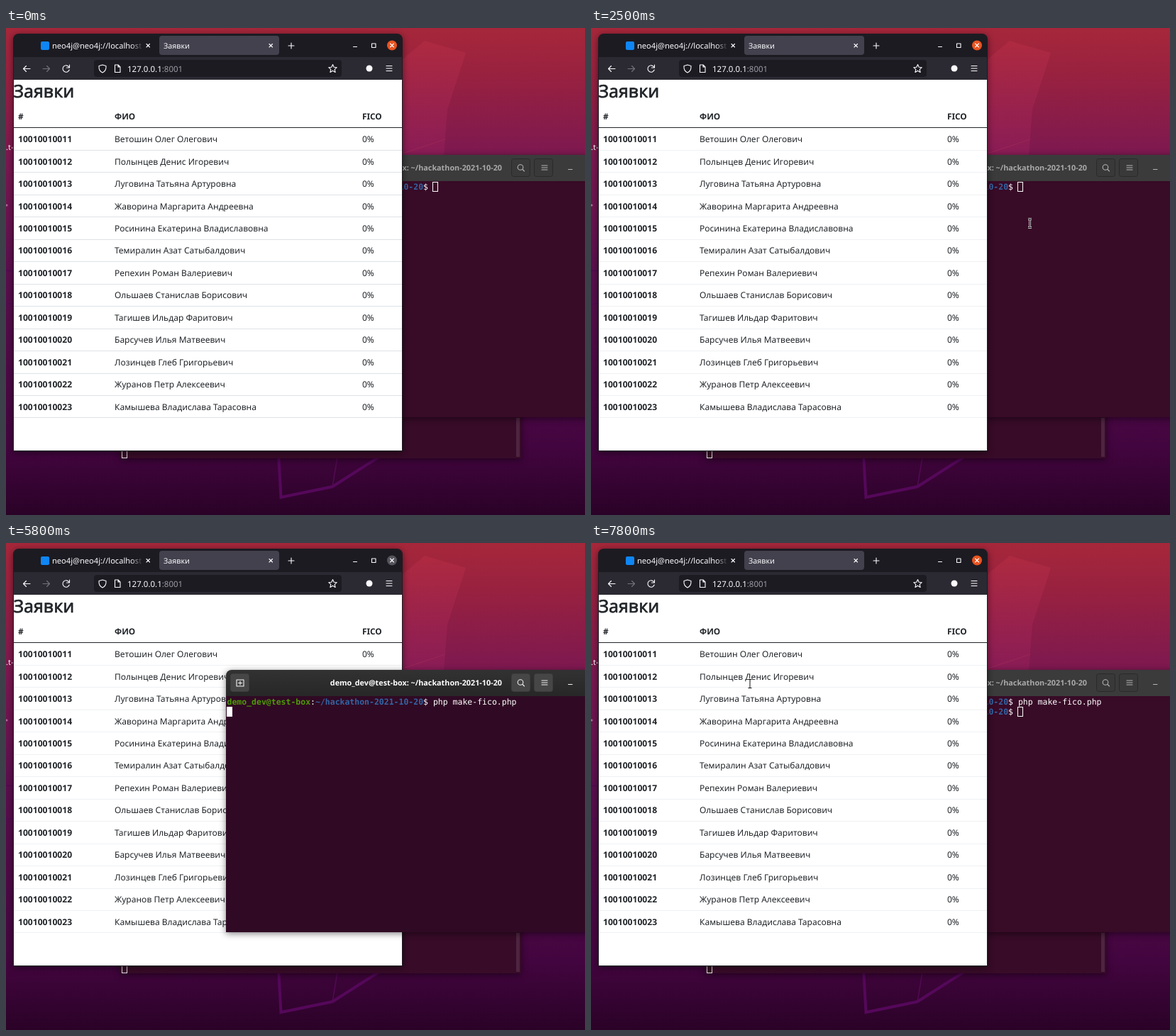
Recreate the animation shown at these times as an HTML page. Size 816 by 687 pixels, loop 8000 ms.

```html
<!DOCTYPE html>
<html lang="ru">
<head>
<meta charset="utf-8">
<title>Заявки</title>
<style>
html, body { margin: 0; width: 100%; height: 100%; overflow: hidden; background: #3c0638; }
svg { display: block; width: 816px; height: 687px; }
text { font-family: "Noto Sans", "Open Sans", sans-serif; white-space: pre; text-rendering: geometricPrecision; }
.line { fill: none; stroke: #fbfbfe; stroke-width: 1.1; stroke-linecap: round; stroke-linejoin: round; }
.page text { font-size: 12px; fill: #212529; }
.page .bold { font-size: 12.1px; font-weight: 700; }
.page .head { font-size: 11.8px; font-weight: 700; }
.page .title { font-size: 24.8px; stroke: #212529; stroke-width: .7px; }
.shade { filter: drop-shadow(0 2px 5px rgba(0, 0, 0, .5)); }
.mono text { font: 11.49px "DejaVu Sans Mono", monospace; fill: #fff; }
.user, .path { font-weight: 700; }
.user { fill: #4e9a06; }
.path { fill: #3465a4; }
#body { fill: #380b27; }
#bar { fill: #3b3b3b; }
#caption { font-size: 10.8px; font-weight: 700; fill: #a9a9a9; text-anchor: end; }
.btn { fill: #393939; stroke: #2a2a2a; }
#term .line { stroke: #b5b5b5; }
#close { fill: #e95420; }
.typing #body { fill: #300a24; }
.typing #bar { fill: url(#barFill); }
.typing #caption { fill: #fff; }
.typing .btn { fill: #464646; stroke: #3d3d3d; }
.typing #term .line { stroke: #f2f2f2; }
.typing #close { fill: #55545c; }
.hidden { display: none; }
</style>
</head>
<body>
<svg id="stage" viewBox="0 0 816 687">
  <defs>
    <linearGradient id="sky" x2="0" y2="1">
      <stop stop-color="#a6273a"/><stop offset=".1" stop-color="#982140"/>
      <stop offset=".27" stop-color="#7b1851"/><stop offset=".5" stop-color="#5b0f4e"/>
      <stop offset=".86" stop-color="#43053f"/><stop offset="1" stop-color="#2a0227"/>
    </linearGradient>
    <linearGradient id="rock" x2="0" y2="1">
      <stop stop-color="#b12b41"/><stop offset="1" stop-color="#8c1d58"/>
    </linearGradient>
    <linearGradient id="barFill" x2="0" y2="1">
      <stop stop-color="#323232"/><stop offset="1" stop-color="#272727"/>
    </linearGradient>
    <linearGradient id="fade">
      <stop stop-color="#1c1b22" stop-opacity="0"/><stop offset="1" stop-color="#1c1b22"/>
    </linearGradient>
  </defs>

  <rect width="816" height="687" fill="url(#sky)"/>
  <path d="M540 60 590 18 648 35 622 115 617 180H540Z" fill="url(#rock)" opacity=".8"/>
  <path d="M556 178 619 157" stroke="#9a2656" fill="none"/>
  <path d="M384 600 387.500 662 460 647 526 605" stroke="#55085a" stroke-width="4" fill="none"/>
  <path d="M468 600 460 647M0 342 11 343M0 390 11 388" stroke="#520a53" stroke-width="1.500" fill="none"/>
  <circle cx="1" cy="250" r="1.500" fill="#b06a9a"/>
  <text x="0" y="172" font-size="11" fill="#fff">.t-</text>

  <g class="shade">
    <rect x="161" y="300" width="565" height="307" fill="#380b28"/>
    <rect x="719" y="550" width="5" height="55" fill="#4d2540"/>
    <rect x="163.500" y="594" width="7" height="12.500" fill="none" stroke="#e8e0e6"/>
  </g>

  <g id="term" class="shade">
    <rect id="body" x="310" y="200" width="520" height="349"/>
    <path id="bar" d="M310 216V187a8 8 0 0 1 8-8H830V216Z"/>
    <g id="buttons"></g>
    <g class="line">
      <path d="M325 202V193H335V202ZM330 195V200M327.500 197.500H332.500"/>
      <circle cx="725" cy="196.500" r="3.800"/><path d="M728 199.500 730.500 202"/>
      <path d="M755 194H763M755 197H763M755 200H763M792.500 199.500H798"/>
    </g>
    <text id="caption" x="699" y="201"></text>
    <g class="mono">
      <text x="311.500" y="228"><tspan class="prompt"></tspan><tspan id="command"></tspan></text>
      <text id="next" x="311.500" y="241.500"><tspan class="prompt"></tspan></text>
      <rect id="caret" width="7" height="13" stroke="#fff"/>
    </g>
  </g>

  <g id="browser" class="shade">
    <path d="M10 597V16a8 8 0 0 1 8-8H551a8 8 0 0 1 8 8V597Z" fill="#1c1b22"/>
    <rect id="tab" x="43" y="11" width="169" height="27" rx="4" fill="#35343d"/>
    <rect x="49" y="19" width="12" height="12" rx="2" fill="#0f86f5"/>
    <text x="65" y="29" font-size="11.100" fill="#fbfbfe">neo4j@neo4j://localhost</text>
    <rect x="176" y="14" width="17" height="21" fill="url(#fade)"/>
    <rect x="216" y="11" width="169" height="27" rx="4" fill="#42414d"/>
    <rect id="burst" x="216" y="11" height="27" rx="4" fill="#33597c"/>
    <text x="222" y="29" font-size="10.700" fill="#fbfbfe">Заявки</text>
    <circle id="close" cx="544" cy="24.500" r="7"/>
    <rect x="11" y="41" width="547" height="32" fill="#2b2a33"/>
    <rect id="hover" x="72" y="45" width="25" height="24" rx="4" fill="#5b5b66"/>
    <rect x="124" y="45" width="349" height="24" rx="4" fill="#1c1b22"/>
    <text x="171" y="61.500" font-size="11.500" fill="#fbfbfe">127.0.0.1<tspan fill="#9c9ba4">:8001</tspan></text>
    <g class="line">
      <path d="M198 22.500 202.500 27M202.500 22.500 198 27M371 22.500 375.500 27M375.500 22.500 371 27"/>
      <path d="M398 25H406M402 21V29M489.500 26.500H494.500M515.500 22H521V27.500H515.500Z"/>
      <path d="M541.500 22 546.500 27M546.500 22 541.500 27"/>
      <path d="M34 57.500H24.500M28.500 53.500 24.500 57.500 28.500 61.500"/>
      <path d="M52 57.500H61.500M57.500 53.500 61.500 57.500 57.500 61.500" opacity=".35"/>
      <path d="M88.700 55A4.700 4.700 0 1 0 89.200 59M89.500 52V56H85.500"/>
      <path d="M136 52 141 53.500Q141.500 60.500 136 63 130.500 60.500 131 53.500Z"/>
      <path d="M153.500 52H158L161 55V62.500H153.500ZM158 52V55H161"/>
      <path d="M460.500 51.500 462.200 55.300 466.300 55.700 463.200 58.400 464.100 62.500 460.500 60.300 456.900 62.500 457.800 58.400 454.700 55.700 458.800 55.300Z"/>
      <path d="M536 53.500H544M536 57H544M536 60.500H544"/>
    </g>
    <circle cx="512" cy="57" r="4.500" fill="#fbfbfe"/>
    <g class="page">
      <rect x="11" y="73" width="547" height="523" fill="#fff"/>
      <text class="title" x="10.500" y="98">Заявки</text>
      <text class="head" x="17" y="129">#</text>
      <text class="head" x="153" y="129">ФИО</text>
      <text class="head" x="502" y="129">FICO</text>
      <rect x="11" y="140" width="547" height="1" fill="#212529"/>
      <g id="rules"></g>
      <g id="rows"></g>
    </g>
  </g>

  <path id="arrow" d="M0 0V13L3 10.300 5.200 15 7.500 14 5.400 9.500H9.500Z" fill="#111" stroke="#fff"/>
  <g id="beam" fill="none">
    <path d="M-2.500-6H2.500M0-6V6M-2.500 6H2.500" stroke="#fff" stroke-width="2.400"/>
    <path d="M-2.500-6H2.500M0-6V6M-2.500 6H2.500" stroke="#111"/>
  </g>
</svg>
<script>
const people = [
  'Ветошин Олег Олегович', 'Полынцев Денис Игоревич', 'Луговина Татьяна Артуровна',
  'Жаворина Маргарита Андреевна', 'Росинина Екатерина Владиславовна', 'Темиралин Азат Сатыбалдович',
  'Репехин Роман Валериевич', 'Ольшаев Станислав Борисович', 'Тагишев Ильдар Фаритович',
  'Барсучев Илья Матвеевич', 'Лозинцев Глеб Григорьевич', 'Журанов Петр Алексеевич',
  'Камышева Владислава Тарасовна'
];
const user = 'demo_dev@test-box', path = '~/hackathon-2021-10-20';
const LOOP = 8000, CELL = 6.9, ROW = 31.45;
const $ = id => document.getElementById(id);
const show = (id, on) => $(id).classList.toggle('hidden', !on);
const set = (id, attrs) => { for (const k in attrs) $(id).setAttribute(k, attrs[k]); };

$('rows').innerHTML = people.map((name, i) => {
  const y = 161.2 + ROW * i;
  return `<text class="bold" x="17" y="${y}">${10010010011 + i}</text>
    <text x="153" y="${y}">${name}</text><text x="502" y="${y}">0%</text>`;
}).join('');
$('rules').innerHTML = people.map((_, i) =>
  `<rect x="11" y="${Math.round(172 + ROW * i)}" width="547" height="1"/>`).join('');
$('buttons').innerHTML = [317, 713, 745].map(x =>
  `<rect class="btn" x="${x - .5}" y="184.500" width="26" height="25" rx="3"/>`).join('');
$('caption').textContent = `${user}: ${path}`;
for (const p of document.querySelectorAll('.prompt'))
  p.innerHTML = `<tspan class="user">${user}</tspan>:<tspan class="path">${path}</tspan>$ `;

// Pointer stops: time, x, y
const stops = [[100, 88, -12], [200, 88, -12], [1100, 89.5, 60.5], [2000, 89.5, 60.5],
  [2500, 618.5, 275.5], [7600, 618.5, 275.5], [7700, 224, 198.5], [LOOP, 224, 198.5]];

function pointer(t) {
  const i = Math.max(1, stops.findIndex(s => s[0] >= t));
  const [a, x, y] = stops[i - 1], [b, u, v] = stops[i];
  const k = Math.max(0, (t - a) / (b - a));
  return [x + (u - x) * k, y + (v - y) * k];
}

function command(t) {
  if (t < 3900) return '';
  if (t < 4200) return 'php ';
  if (t < 4500) return 'php m';
  return t < 4800 ? 'php ma' : 'php make-fico.php ';
}

let typing = false;
function draw(t) {
  const focus = t >= 3900 && t < 7800;
  if (focus !== typing) {
    typing = focus;
    $('stage').classList.toggle('typing', focus);
    $('stage').insertBefore($(focus ? 'term' : 'browser'), $('arrow'));
  }

  const text = command(t), entered = t >= 5300, done = t >= 7300;
  const column = entered ? (done ? 42 : 0) : 42 + text.length;
  $('command').textContent = text;
  show('next', done);
  show('caret', t < 6000 || t >= 6700);
  set('caret', {
    x: Math.floor(311.7 + CELL * column) + .5,
    y: entered ? 231.5 : 217.5,
    fill: focus ? '#fff' : 'none'
  });

  const [x, y] = pointer(t);
  const beam = x > 558 && y > 216 || t >= 7700;
  const visible = t >= 100 && (t < 3900 || t >= 6200);
  show('arrow', visible && !beam);
  show('beam', visible && beam);
  set(beam ? 'beam' : 'arrow', { transform: `translate(${x} ${y})` });
  show('tab', t >= 300 && y > 10 && y < 38 && x < 213);
  show('hover', x >= 72 && x < 97 && y > 44 && y < 70);

  const load = (t - 1400) / 250;
  show('burst', load > 0 && load < 2);
  set('burst', { width: 169 * Math.min(1, Math.max(0, load)), opacity: .38 * Math.min(1, Math.max(0, 2 - load)) });
  set('rules', { fill: t < 1200 ? '#dee2e6' : '#f0f1f3' });
}

const start = performance.now();
function tick() {
  const t = (performance.now() - start) % LOOP;
  draw(Math.floor(t / 100) * 100);
  requestAnimationFrame(tick);
}
tick();
</script>
</body>
</html>
```
